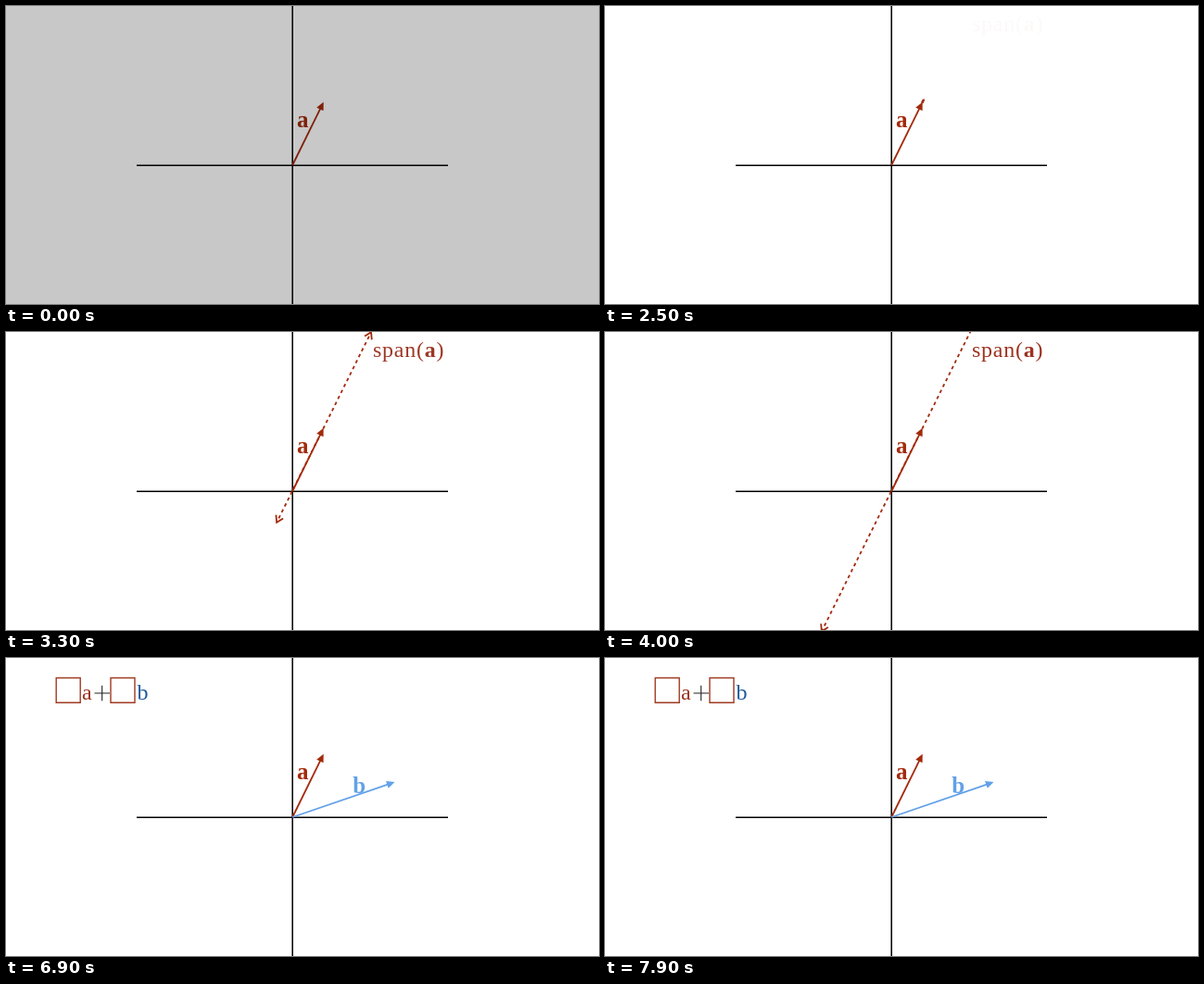
An HTML page for the animation above (8000 ms loop, 640 by 322 pixels).

```html
<!DOCTYPE html>
<html lang="en">
<head>
<meta charset="utf-8">
<title>Span of vectors</title>
<style>
  html, body { margin: 0; width: 100%; height: 100%; overflow: hidden; background: #fff; }
  svg { display: block; width: 640px; height: 322px; }
  text { font: 24px "Liberation Serif", "Times New Roman", serif; }
  .bold { font-size: 25px; font-weight: bold; }
  .line { fill: none; stroke-width: 1.8; }
  .red { --ink: #a32a0c; }
  .blue { --ink: #62a1e8; }
  .red .line, .blue .line { stroke: var(--ink); }
  .red .fill, .blue .fill { fill: var(--ink); }
</style>
</head>
<body>
<svg viewBox="0 0 640 322">
  <rect width="640" height="322" fill="#fff"/>
  <path d="M141 172.2H477M309.2 0V322" stroke="#000" stroke-width="1.5"/>

  <g id="span" class="red">
    <path id="dashes" class="line" stroke-dasharray="3.6 3.6" stroke-dashoffset="1.8"/>
    <path id="heads" class="line"/>
    <text id="spanLabel" x="396" y="27" fill="#9c3320" letter-spacing="0.75">span(<tspan font-weight="bold">a</tspan>)</text>
  </g>

  <g id="vecA" class="red">
    <path class="line"/><path class="fill"/>
    <text class="bold fill" x="314" y="131">a</text>
  </g>
  <g id="vecB" class="blue">
    <path class="line"/><path class="fill"/>
    <text class="bold fill" x="374.3" y="145.5">b</text>
  </g>

  <g id="formula">
    <path d="M54.2 21.5h26v26.8h-26zM113 21.5h26v26.8h-26z" fill="none" stroke="#a03a22" stroke-width="1.4"/>
    <text x="82" y="45" font-size="26" fill="#9c3320">a</text>
    <path d="M95.5 38H112M103.7 29.8V46.2" stroke="#222" stroke-width="1.1"/>
    <text x="141.5" y="45" font-size="26" fill="#1f5a9a">b</text>
  </g>

  <rect id="shade" width="640" height="322" fill="#000" opacity="0.2157"/>
</svg>
<script>
  const LOOP = 8000, STEP = 100;
  const GROW = { start: 2400, time: 2000, reach: 272 };
  const FADE = { start: 2400, time: 1000 };
  const SWAP = 5100, FORMULA = 6900;
  const origin = [309.2, 172], middle = [343.1, 103], dir = [0.444, -0.896];

  const $ = id => document.getElementById(id);
  const show = (id, on) => $(id).style.display = on ? "" : "none";
  const ease = ({ start, time }, t) => {
    const p = Math.min(1, Math.max(0, (t - start) / time));
    return (1 - Math.cos(Math.PI * p)) / 2;
  };
  // Point at a distance along u from p, shifted sideways.
  const along = (p, u, far, side = 0) =>
    [p[0] + u[0] * far - u[1] * side, p[1] + u[1] * far + u[0] * side];

  function vector(id, tip) {
    const dx = tip[0] - origin[0], dy = tip[1] - origin[1], len = Math.hypot(dx, dy);
    const u = [dx / len, dy / len];
    const [line, head] = $(id).querySelectorAll("path");
    line.setAttribute("d", `M${origin}L${along(tip, u, -7)}`);
    head.setAttribute("d", `M${tip}L${along(tip, u, -8.6, -4.1)}L${along(tip, u, -8.6, 4.1)}Z`);
  }

  function drawSpan(t) {
    const half = GROW.reach * ease(GROW, t);
    const size = Math.min(1, half / 8);
    let dashes = "", heads = "";
    for (const sign of [1, -1]) {
      const u = dir.map(v => v * sign);
      const tip = along(middle, u, half);
      dashes += `M${middle}L${tip}`;
      heads += `M${along(tip, u, -7 * size, -4.3 * size)}L${tip}L${along(tip, u, -7 * size, 4.3 * size)}`;
    }
    $("dashes").setAttribute("d", dashes);
    $("heads").setAttribute("d", heads);
    $("spanLabel").setAttribute("opacity", ease(FADE, t));
  }

  function frame() {
    const t = Math.floor(performance.now() % LOOP / STEP) * STEP;
    show("shade", t < 100);
    show("span", t > GROW.start && t < SWAP);
    show("vecB", t >= SWAP);
    show("formula", t >= FORMULA);
    drawSpan(t);
    requestAnimationFrame(frame);
  }

  vector("vecA", [342.7, 103.8]);
  vector("vecB", [419.5, 134]);
  frame();
</script>
</body>
</html>
```
